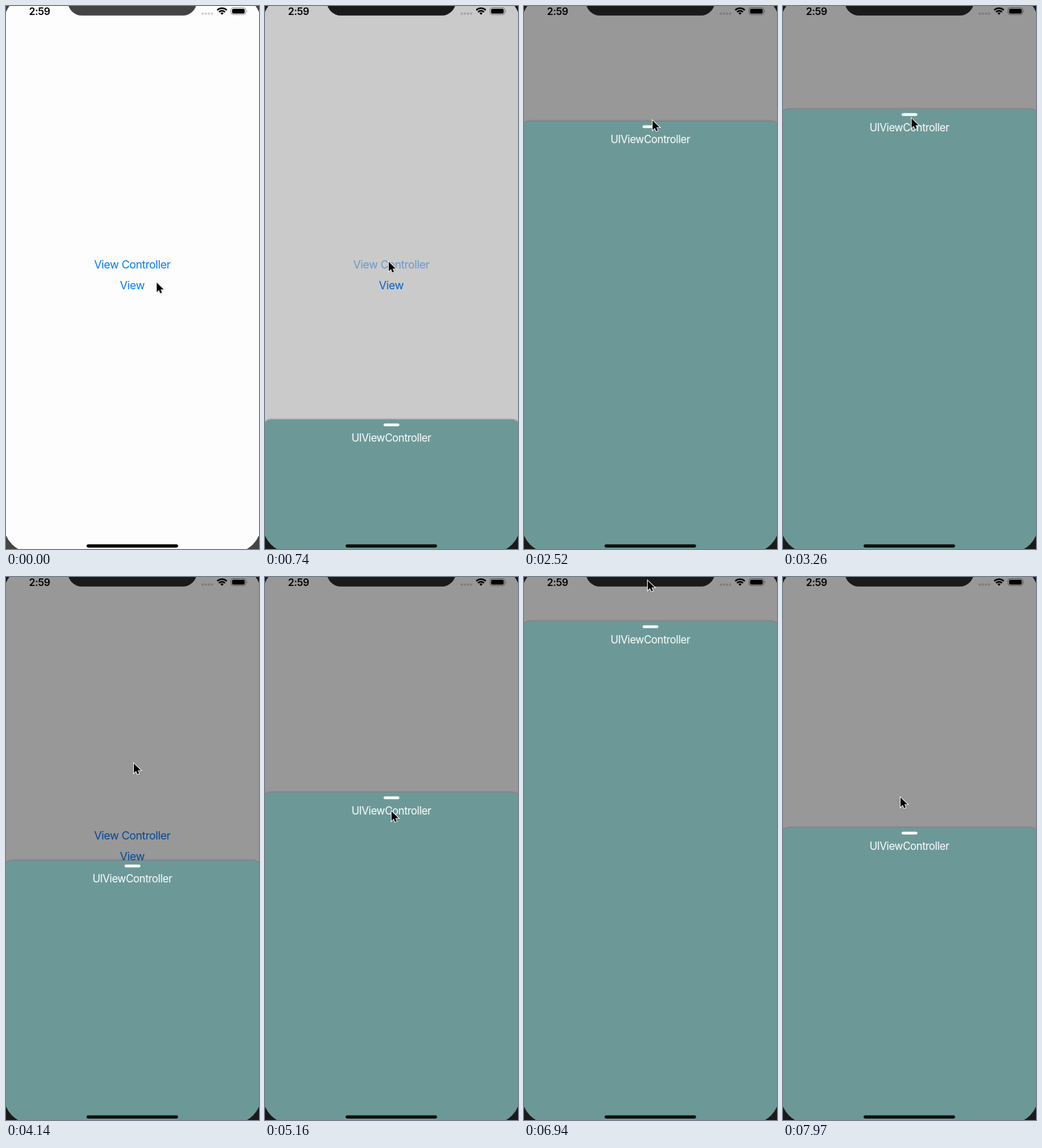
Animation, 366 px wide and 784 px high, one loop 8 s. Source, as an HTML page:

```html
<!DOCTYPE html>
<html lang="en">
<head>
<meta charset="utf-8">
<title>Bottom sheet</title>
<style>
  html, body { margin: 0; width: 100%; height: 100%; overflow: hidden; }
  svg { display: block; width: 366px; height: 784px; }
  text { font-family: Inter, Roboto, sans-serif; letter-spacing: -.025em; text-anchor: middle; }
  .link { font-size: 16.1px; fill: #007aff; }
  #case { fill: #444; }
  #case.dark { fill: #1a1a1a; }
</style>
</head>
<body>
<svg viewBox="0 0 366 784">
  <defs>
    <clipPath id="screen"><rect x="-3" y="-16" width="372" height="805" rx="40"/></clipPath>
    <filter id="blur" x="-50%" y="-50%" width="200%" height="200%"><feGaussianBlur stdDeviation="1.5"/></filter>
  </defs>
  <g id="case">
    <rect width="366" height="784"/>
    <g clip-path="url(#screen)">
      <rect width="366" height="784" fill="#fdfdfd"/>
      <text id="first" class="link" x="182.7" y="378.6">View Controller</text>
      <text class="link" x="182.7" y="409.2">View</text>

      <g fill="#000">
        <text x="48.5" y="12.6" font-size="14.6" font-weight="600">2:59</text>
        <g fill="#ccc">
          <circle cx="284.6" cy="11" r="1.7"/><circle cx="289.1" cy="11" r="1.7"/>
          <circle cx="293.6" cy="11" r="1.7"/><circle cx="298.1" cy="11" r="1.7"/>
        </g>
        <g fill="none" stroke="#000" stroke-width="2.1">
          <path d="M305.6 6a9.7 9.7 0 0 1 13.8 0M308.1 8.7a6.2 6.2 0 0 1 8.8 0"/>
        </g>
        <path d="M312.5 12.7l-2.3-2.4a3.3 3.3 0 0 1 4.6 0z"/>
        <rect x="325.5" y="2.5" width="21.4" height="10" rx="3" fill="none" stroke="#000" stroke-opacity=".4"/>
        <rect x="327.1" y="4" width="18.2" height="7" rx="1.7"/>
        <path d="M348 5.8q1.6 1.7 0 3.4z" fill-opacity=".45"/>
      </g>

      <rect id="dim" width="366" height="784" fill="#000"/>
      <g id="sheet">
        <rect x="-3" width="372" height="900" rx="12" fill="#000" opacity=".4" filter="url(#blur)"/>
        <rect x="-3" width="372" height="900" rx="12" fill="#6c9998"/>
        <rect x="171.5" y="5.8" width="23" height="4" rx="2" fill="#fff"/>
        <text x="182.7" y="31.7" font-size="15.2" fill="#fff">UIViewController</text>
      </g>
      <rect id="home" x="116.5" y="777.2" width="132.5" height="4.8" rx="2.4"/>
    </g>
    <rect x="89.5" y="-30" width="186.5" height="43.7" rx="20"/>
  </g>
  <g id="cursor">
    <path d="M1 2v14l3.300-3 2 4.700 2.400-1-2-4.600h4.600z" opacity=".35" filter="url(#blur)"/>
    <path d="M1 1.300v13.800l3.200-3 2 4.700 2.400-1-2-4.600h4.600z" stroke="#fff" stroke-width="1.8" paint-order="stroke"/>
  </g>
</svg>
<script>
// Time is counted in steps: the screen refreshes once per step
const LOOP = 8000, STEP = 147.6, PRESS = 5;
const HIDDEN = 790, REST = 414, TOP = 149;

// Pointer strokes: start, end, x and y reached
const strokes = [
  [0, 3, 178, 368], [10, 12, 174, 412], [13, 17.3, 185, 161], [22, 27, 184, 268],
  [28, 31, 181, 440], [31, 37, 182, 234], [39, 41, 184, 174], [42, 47, 178, 4],
  [47, 50, 172, 174], [50, 54, 169, 317]
];

// Sheet grabs: start, release, height it settles at
const grabs = [
  [4.6, 4.6, REST], [13, 17, TOP], [22, 26, REST],
  [31, 36, TOP], [42, 50, TOP], [50, 53.5, REST]
];

const el = id => document.getElementById(id);
const [phone, first, dim, sheet, home, cursor] =
  ['case', 'first', 'dim', 'sheet', 'home', 'cursor'].map(el);

const clamp = v => Math.max(0, Math.min(1, v));
const ease = u => u * u * (3 - 2 * u);

function pointer(k) {
  let x = 217, y = 398;
  for (const [start, end, toX, toY] of strokes) {
    const f = ease(clamp((k - start) / (end - start)));
    x += (toX - x) * f;
    y += (toY - y) * f;
  }
  return [x, y];
}

// Pulling past the top moves the sheet at half speed
const pull = y => y < TOP ? (TOP + y) / 2 : y;

function sheetTop(k) {
  let top = HIDDEN;
  grabs.forEach(([start, release, rest], i) => {
    if (k < start) return;
    const next = grabs[i + 1] ? grabs[i + 1][0] : Infinity;
    const until = Math.min(k, next);
    top = pull(top + pointer(Math.min(until, release))[1] - pointer(start)[1]);
    top = rest + (top - rest) * Math.exp(-1.8 * Math.max(0, until - release));
  });
  return top;
}

function draw(now) {
  const k = Math.floor((now % LOOP + 2) / STEP);
  const top = sheetTop(k), shown = clamp((HIDDEN - top) / (HIDDEN - REST));

  phone.classList.toggle('dark', k >= PRESS);
  first.style.opacity = k < PRESS ? 1 : 1 - .53 * Math.exp(PRESS - k);
  dim.style.opacity = .4 * shown;
  sheet.setAttribute('transform', `translate(0 ${top.toFixed(1)})`);
  home.setAttribute('fill', shown ? '#111' : '#000');
  cursor.setAttribute('transform', `translate(${pointer(k).map(Math.round)})`);
  requestAnimationFrame(draw);
}
draw(0);
</script>
</body>
</html>
```
